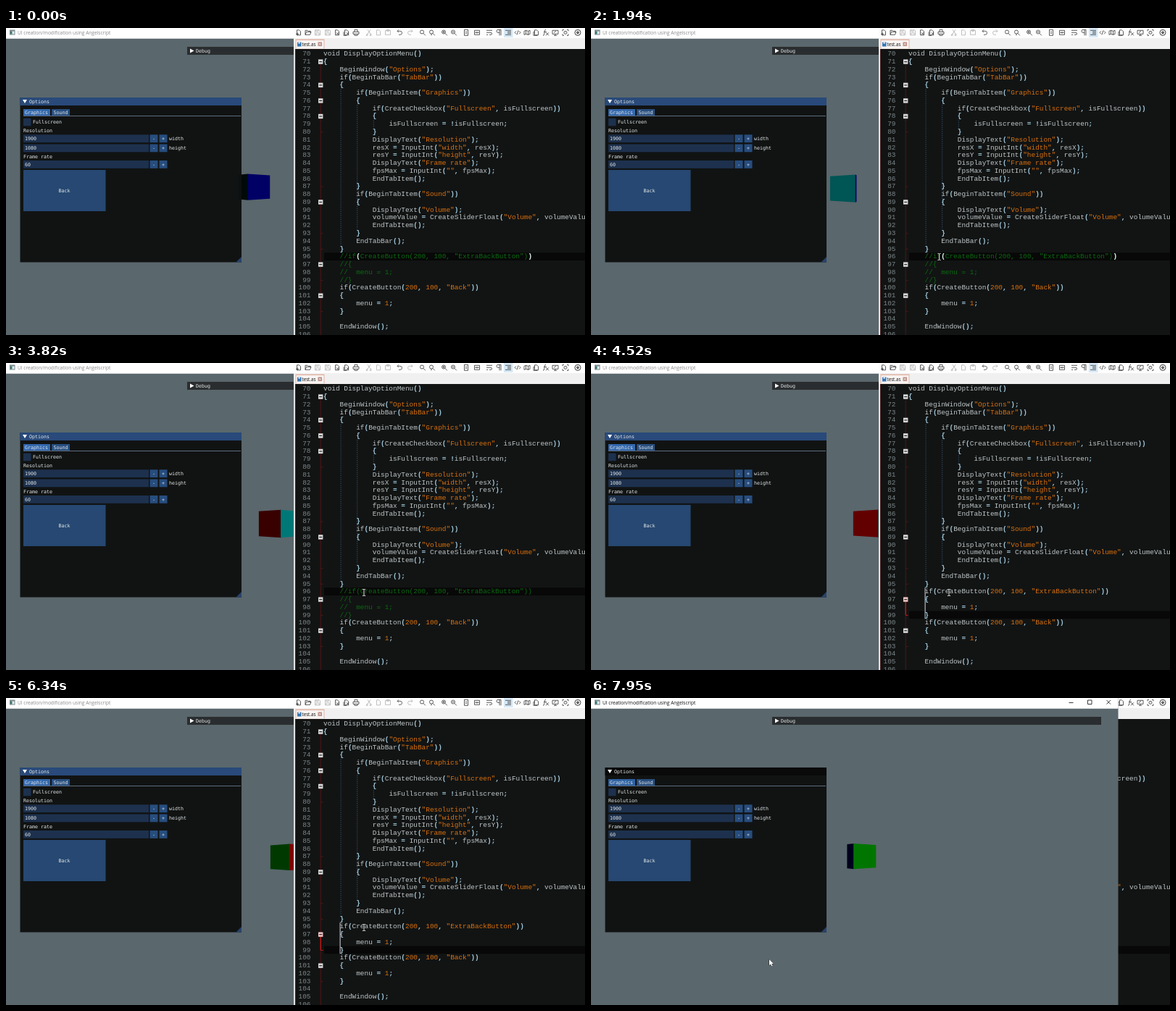
These frames come from a looping animation (799x424 px, 8000 ms). An HTML page with a canvas:

```html
<!DOCTYPE html>
<html lang="en">
<head>
<meta charset="utf-8">
<title>UI scripting demo</title>
<style>
  html, body { margin: 0; width: 100%; height: 100%; overflow: hidden; background: #5a676c; }
  canvas { display: block; }
</style>
</head>
<body>
<canvas id="stage" width="799" height="424"></canvas>
<script>
const LOOP = 8000, EDIT = 4150, SELECT = 3880, BRACE_OFF = 2450, TO_FRONT = 7000;
const CODE_X = 438, ADVANCE = 5.65, PITCH = 10.77, FIRST_LINE = 70, EDITOR_X = 397;
const CODE_FONT = '9.417px "Liberation Mono", monospace';
const UI_FONT = '6.65px "DejaVu Sans Mono", monospace';
const ctx = document.getElementById('stage').getContext('2d');

const source = `void DisplayOptionMenu()
{
    BeginWindow("Options");
    if(BeginTabBar("TabBar"))
    {
        if(BeginTabItem("Graphics"))
        {
            if(CreateCheckbox("Fullscreen", isFullscreen))
            {
                isFullscreen = !isFullscreen;
            }
            DisplayText("Resolution");
            resX = InputInt("width", resX);
            resY = InputInt("height", resY);
            DisplayText("Frame rate");
            fpsMax = InputInt("", fpsMax);
            EndTabItem();
        }
        if(BeginTabItem("Sound"))
        {
            DisplayText("Volume");
            volumeValue = CreateSliderFloat("Volume", volumeValue, 0, 100);
            EndTabItem();
        }
        EndTabBar();
    }
    if(CreateButton(200, 100, "ExtraBackButton"))
    {
        menu = 1;
    }
    if(CreateButton(200, 100, "Back"))
    {
        menu = 1;
    }

    EndWindow();
`.split('\n');

const commented = {
  96: '    //if(CreateButton(200, 100, "ExtraBackButton"))',
  97: '    //{',
  98: '    //  menu = 1;',
  99: '    //}'
};

// [x, path, colour]
const doc = 'M-2.5-3.5h3l2 2v5h-5z', floppy = 'M-3.5-3.5h6l1 1v6h-7zM-2 3.5v-3h4v3M-2-3.5v2h3v-2';
const lens = 'M-3.5-.8a2.5 2.5 0 1 0 5 0a2.5 2.5 0 1 0-5 0M.8 1l3 3', page = 'M-3.5-3h7v6h-7z';
const GREY = '#b0b0b0', DARK = '#333';
const icons = [
  [404, doc + 'M-4 2h4M-2 0v4', DARK],
  [417, 'M-4 3v-6h3l1 1h3v2M-4 3l1.5-4h6.5l-1.5 4z', DARK],
  [430, floppy, GREY], [444, floppy, GREY],
  [457, doc + 'M-1 0l3 3M2 0l-3 3', DARK],
  [470, doc + 'M-4-1v5h4M0 0l3 3M3 0l-3 3', DARK],
  [483, 'M-2-1v-3h4v3M-4-1h8v3h-8zM-2 2v2h4v-2', DARK],
  [501, 'M-2-4l4 6M2-4l-4 6M-3 2h1v2h-2zM2 2h1v2h-2z', GREY],
  [514, doc, GREY],
  [527, page + 'M-1.5-4h3v2h-3z', GREY],
  [543, 'M-1-4l-2 2 2 2M-3-2h4a2.5 2.5 0 0 1 0 5h-2', '#444'],
  [558, 'M1-4l2 2-2 2M3-2h-4a2.5 2.5 0 0 0 0 5h2', GREY],
  [575, lens, DARK], [588, lens + 'M-2 3h2', DARK],
  [605, lens + 'M-2.5-.8h3M-1-2.3v3', DARK], [618, lens + 'M-2.5-.8h3', DARK],
  [635, 'M-2.5-4h5v8h-5zM-1-1h2M-1 1h2', DARK],
  [650, page + 'M-2 0h4M-1-1l-1 1 1 1M1-1l1 1-1 1', DARK],
  [667, 'M-4-3h8M-4 0h6a1.5 1.5 0 0 1 0 3h-2M-4 3h2', DARK],
  [680, 'M1-4v8M3-4v8M3-4h-4a2 2 0 0 0 0 4h2', DARK],
  [693, 'M-4-3h8M-1-1h5M-1 1h5M-4 3h8', DARK],
  [706, 'M-2-2l-2 2 2 2M2-2l2 2-2 2M1-3l-2 6', DARK],
  [719, 'M-4-2l2.5-1 3 1 2.5-1v5l-2.5 1-3-1-2.5 1zM-1.5-3v5M1.5-2v5', DARK],
  [732, doc + 'M-3-1h-1v5h5v-1', DARK],
  [745, 'M0-4c-2 0-1.5 2-2 4s0 4-2 4M-3-1h4M0 0l4 4M4 0l-4 4', DARK],
  [758, 'M-4-3h8v5h-8zM0 2v2M-2 4h4M-2 0l3-2', DARK],
  [772, 'M-4-2v-2h2M2-4h2v2M4 2v2h-2M-2 4h-2v-2M-2 0a2 2 0 1 0 4 0a2 2 0 1 0-4 0', DARK],
  [789, 'M-4 0a4 4 0 1 0 8 0a4 4 0 1 0-8 0M-1.5 0a1.5 1.5 0 1 0 3 0a1.5 1.5 0 1 0-3 0M-1 0h2', '#111']
].map(([x, path, colour]) => [x, new Path2D(path), colour]);

// [time, x, y] of the mouse
const mousePath = [
  [400, 760, 434], [600, 744, 424], [820, 670, 393], [960, 600, 365], [1030, 582, 359],
  [1250, 582, 359], [1640, 486, 316], [2300, 474, 316], [2800, 474, 316],
  [3300, 489, 317], [3700, 494, 317], [6450, 494, 317], [6690, 262, 338],
  [6850, 246, 361], [LOOP, 246, 361]
];

const clamp01 = v => Math.min(1, Math.max(0, v));
const smooth = v => (v = clamp01(v), v * v * (3 - 2 * v));
const lineY = n => 35.6 + (n - FIRST_LINE) * PITCH;
const baseline = n => lineY(n) + 2.7;
const columnX = c => CODE_X + c * ADVANCE;

function rect(x, y, w, h, colour) {
  ctx.fillStyle = colour;
  ctx.fillRect(x, y, w, h);
}

function poly(points, colour) {
  ctx.fillStyle = colour;
  ctx.beginPath();
  points.forEach(([x, y]) => ctx.lineTo(x, y));
  ctx.fill();
}

function stroke(path, colour, width = 1) {
  ctx.strokeStyle = colour;
  ctx.lineWidth = width;
  ctx.stroke(path);
}

function text(str, x, y, colour, font, align = 'left') {
  ctx.font = font;
  ctx.fillStyle = colour;
  ctx.textAlign = align;
  ctx.fillText(str, x, y);
}

const label = (str, x, centreY, align) => text(str, x, centreY + 2.3, '#e4e8e8', UI_FONT, align);

function drawCube(t) {
  const orbit = Math.PI * (t - 600) / 5300, depth = Math.sin(orbit);
  const cx = 365 - 24 * Math.cos(orbit), cy = 220.3 + 1.8 * depth;
  const size = 33.7 + 1.6 * depth;
  const turn = 23 + 33.1 * t / 1000, quarter = Math.floor(turn / 90), a = turn % 90;
  const rad = a * Math.PI / 180;
  const leftW = size * Math.sin(rad), rightW = size * Math.cos(rad);
  const x0 = cx - (leftW + rightW) / 2, x1 = x0 + leftW, x2 = x1 + rightW;
  const half = size * .53, near = half + .6;
  const hues = [[0, 0, 1], [0, 1, 1], [1, 0, 0], [0, 1, 0]];
  const shade = (index, angle) => {
    const v = 24 + 91 * smooth((angle - 28) / 85) + .6 * (cx - 365);
    return `rgb(${hues[index % 4].map(c => Math.round(c * v))})`;
  };
  const farL = half - 1.6 * Math.sin(rad), farR = half - 1.6 * Math.cos(rad);
  poly([[x0, cy - farL], [x1 + .3, cy - near], [x1 + .3, cy + near], [x0, cy + farL]], shade(quarter + 1, a));
  poly([[x1, cy - near], [x2, cy - farR], [x2, cy + farR], [x1, cy + near]], shade(quarter, a + 90));
}

function drawField(y, value, name) {
  rect(24, y, 173, 10.8, '#1d314e');
  rect(198.5, y, 11, 10.8, '#274d7e');
  rect(211.5, y, 11, 10.8, '#274d7e');
  label(value, 26, y + 5.4);
  label('-', 204, y + 5.4, 'center');
  label('+', 217, y + 5.4, 'center');
  label(name, 225, y + 5.4);
}

function drawOptions(focused) {
  rect(19.5, 96, 305.5, 227.5, 'rgba(15,17,17,.97)');
  rect(19.5, 96, 305.5, 11, focused ? '#294a7a' : '#0a0a0a');
  poly([[23, 99], [29, 99], [26, 104]], '#fff');
  label('Options', 32, 101.7);
  rect(24, 112, 37, 10, focused ? '#3368ad' : '#2f62a3');
  rect(63, 112, 25, 10, '#294f80');
  rect(24, 121, 300, 1, '#5b6a7c');
  label('Graphics', 26, 117);
  label('Sound', 65.5, 117);
  rect(24, 124.7, 10.5, 10.5, '#1d314e');
  label('Fullscreen', 37, 130);
  label('Resolution', 24, 141.5);
  drawField(147.3, '1900', 'width');
  drawField(160.5, '1080', 'height');
  label('Frame rate', 24, 177.5);
  drawField(183, '60', '');
  rect(24, 196, 113.5, 57, '#264872');
  label('Back', 80.5, 224.7, 'center');
  poly([[325, 316], [325, 323.5], [317.5, 323.5]], '#28446c');
}

function drawApp(t, active) {
  rect(0, 0, 727.5, 424, '#5a676c');
  rect(0, 0, 727.5, 14.7, '#fff');
  rect(5, 2.5, 7.5, 7, '#7d8a8c');
  rect(6, 4.5, 5.5, 4, '#e3ecec');
  rect(6, 4.5, 2.5, 4, '#3b7776');
  text('UI creation/modification using Angelscript', 16, 8.8, active ? '#111' : '#8a8a8a', '6.59px "Open Sans", sans-serif');
  stroke(new Path2D('M659.5 6.5h6M685.5 3h5.5v5.5h-5.5zM711.5 3l5.5 5.5M717 3l-5.5 5.5'), active ? '#222' : '#999', .9);
  rect(250, 26, 454, 11, '#2a2d2f');
  poly([[254, 28.5], [259.5, 31.5], [254, 34.5]], '#fff');
  label('Debug', 262, 31.7);
  drawCube(t);
  drawOptions(!active);
}

function drawCodeLine(n, str, isComment) {
  const y = baseline(n);
  if (isComment) {
    text(str, columnX(0), y, '#0b6a10', CODE_FONT);
    return;
  }
  for (const { 0: token, index } of str.matchAll(/"[^"]*"|\d+|[{}()=!;,]+|[^"\d{}()=!;,\s]+/g)) {
    const isOperator = /^[{}()=!;,]/.test(token);
    const colour = /^["\d]/.test(token) ? '#d8700e' : isOperator ? '#a0c8da' : '#c0c6c6';
    text(token, columnX(index), y, colour, (isOperator ? 'bold ' : '') + CODE_FONT);
  }
}

function drawGuides() {
  ctx.setLineDash([1.3, 1.5]);
  for (const [col, from, to] of [[4, 75, 94], [8, 77, 92], [12, 79, 79]]) {
    const x = columnX(col) + 1.5;
    stroke(new Path2D(`M${x} ${lineY(from) - 5}V${lineY(to) + 5}`), '#40607a', .8);
  }
  ctx.setLineDash([]);
}

function drawFolds(edited) {
  rect(433.7, lineY(71), 1, 424, '#541414');
  if (edited) rect(433.5, lineY(97), 1.4, lineY(99) - lineY(97), '#c01818');
  for (const n of [80, 87, 93, 95, 99, 103])
    rect(434, lineY(n), 3.5, 1, edited && n === 99 ? '#c01818' : '#541414');
  for (const n of [71, 74, 76, 78, 89, 97, 101]) {
    const y = lineY(n);
    rect(431, y - 3, 6.4, 6.4, edited && n === 97 ? '#f2c4c4' : '#d8d8d8');
    rect(432.2, y - .3, 4, 1.1, '#222');
  }
}

function drawToolbar() {
  rect(EDITOR_X, 0, 402, 14, '#fdfdfd');
  rect(687, 0, 12.5, 13, '#d6e8f6');
  for (const [x, path, colour] of icons) {
    ctx.save();
    ctx.translate(x, 6.3);
    stroke(path, colour, .8);
    ctx.restore();
  }
  rect(EDITOR_X, 14, 402, 15, '#f0f0f0');
  rect(399.5, 15.5, 40, 13, '#e3b3a4');
  rect(400.5, 17, 38, 11.5, '#f7f3f1');
  rect(402, 19.5, 5.5, 6, '#3477b5');
  rect(403.3, 19.5, 2.6, 2, '#e6eef5');
  text('test.as', 408.5, 25, '#111', '6.2px "Open Sans", sans-serif');
  rect(430.5, 19.5, 5.5, 5.5, '#b98b83');
  stroke(new Path2D('M431.8 20.8l3 3M434.8 20.8l-3 3'), '#fff', .8);
}

function drawEditor(t) {
  const edited = t >= EDIT;
  const rows = clamp01((t - SELECT) / 200) * 3;
  const current = edited ? 99 : 96 + Math.floor(rows);
  rect(EDITOR_X, 0, 402, 424, '#121414');
  rect(EDITOR_X, 29, 2, 395, '#dfe2e2');
  rect(EDITOR_X + 2, 29, 1, 395, '#4a2020');
  rect(439, lineY(current) - 5.4, 360, PITCH, '#080808');
  if (!edited && t >= SELECT)
    rect(columnX(4), lineY(96) - 5.4, 2 * ADVANCE, (current - 95) * PITCH, '#36434c');
  drawGuides();
  source.forEach((str, i) => {
    const n = FIRST_LINE + i, hidden = !edited && commented[n];
    text(n, 420.5, baseline(n), '#7d8688', CODE_FONT, 'right');
    drawCodeLine(n, hidden || str, hidden);
  });
  if (t < BRACE_OFF)
    for (const [char, col] of [['(', 8], [')', 50]])
      text(char, columnX(col), baseline(96), '#e8f4f4', 'bold ' + CODE_FONT);
  drawFolds(edited);
  if (edited && Math.floor((t - EDIT) / 530) % 2 === 0)
    rect(columnX(4), lineY(96) - 5.4, 1, 4 * PITCH, '#d8d8e0');
  drawToolbar();
}

function drawMouse(t) {
  const next = mousePath.findIndex(p => p[0] > t);
  if (next < 1) return;
  const [t0, x0, y0] = mousePath[next - 1], [t1, x1, y1] = mousePath[next];
  const k = (t - t0) / (t1 - t0);
  const x = x0 + (x1 - x0) * k, y = y0 + (y1 - y0) * k;
  ctx.save();
  ctx.translate(x, y);
  if (x < EDITOR_X) {
    const arrow = new Path2D('M0 0v8.2l1.9-1.7 1.4 3.1 1.4-.6-1.4-3h2.6z');
    stroke(arrow, '#222', 1);
    ctx.fillStyle = '#fff';
    ctx.fill(arrow);
  } else {
    const beam = new Path2D('M-2-4.5h1.4l.6.6.6-.6h1.4M0-4v8M-2 4.5h1.4l.6-.6.6.6h1.4');
    stroke(beam, '#000', 2.2);
    stroke(beam, '#eee', 1);
  }
  ctx.restore();
}

function frame(now) {
  const t = now % LOOP;
  ctx.clearRect(0, 0, 799, 424);
  if (t < TO_FRONT) {
    drawApp(t, false);
    drawEditor(t);
  } else {
    drawEditor(t);
    drawApp(t, true);
  }
  drawMouse(t);
  requestAnimationFrame(frame);
}
requestAnimationFrame(frame);
</script>
</body>
</html>
```
